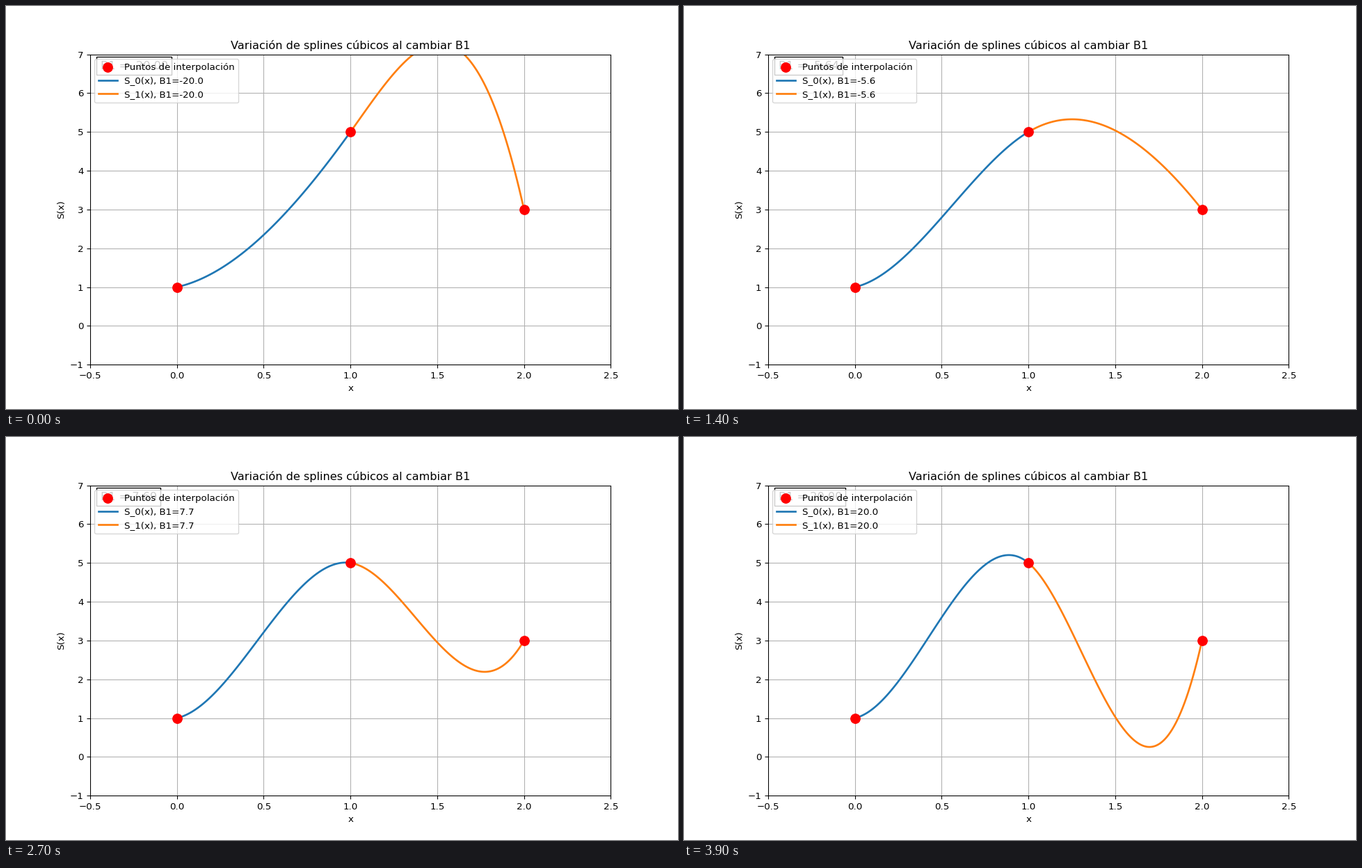
Animation, 966 px wide and 580 px high, one loop 4000 ms. Source, as a matplotlib script:

```python
import numpy as np
import matplotlib.pyplot as plt
from matplotlib.animation import FuncAnimation

WIDTH, HEIGHT, DPI = 966, 580, 96.6
FRAMES = 40
KNOTS_X = [0, 1, 2]
KNOTS_Y = [1, 5, 3]
START_SLOPE = 1
END_SLOPES = np.linspace(-20, 20, FRAMES)
T = np.linspace(0, 1, 100)


def hermite(y0, y1, m0, m1):
    """Cubic on [0, 1] with the given end values and end slopes."""
    return ((2 * T**3 - 3 * T**2 + 1) * y0 + (T**3 - 2 * T**2 + T) * m0
            + (3 * T**2 - 2 * T**3) * y1 + (T**3 - T**2) * m1)


def clamped_spline(end_slope):
    y0, y1, y2 = KNOTS_Y
    mid_slope = (3 * (y2 - y0) - START_SLOPE - end_slope) / 4
    return (hermite(y0, y1, START_SLOPE, mid_slope),
            hermite(y1, y2, mid_slope, end_slope))


# The tiny margin keeps the pixel size from being truncated one short.
size = ((WIDTH + 0.01) / DPI, (HEIGHT + 0.01) / DPI)
fig, ax = plt.subplots(figsize=size, dpi=DPI)
ax.set_xlim(-0.5, 2.5)
ax.set_ylim(-1, 7)
ax.set_xlabel("x")
ax.set_ylabel("S(x)")
ax.set_title("Variación de splines cúbicos al cambiar B1")
ax.grid(True)

ax.scatter(KNOTS_X, KNOTS_Y, color="red", s=100, zorder=5,
           label="Puntos de interpolación")
curves = [ax.plot(T + i, T, lw=2, label=f"S_{i}(x)")[0] for i in range(2)]
value_text = ax.text(0.02, 0.98, "", transform=ax.transAxes, fontsize=12,
                     va="top", bbox=dict(facecolor="white"))
legend = ax.legend(loc="upper left")


def update(frame):
    b1 = END_SLOPES[frame]
    labels = legend.get_texts()[1:]
    for i, (curve, y) in enumerate(zip(curves, clamped_spline(b1))):
        curve.set_ydata(y)
        labels[i].set_text(f"S_{i}(x), B1={b1:.1f}")
    value_text.set_text(f"B1 = {b1:.2f}")
    return [*curves, value_text, legend]


anim = FuncAnimation(fig, update, frames=FRAMES, interval=100, repeat=True)
plt.show()
```
